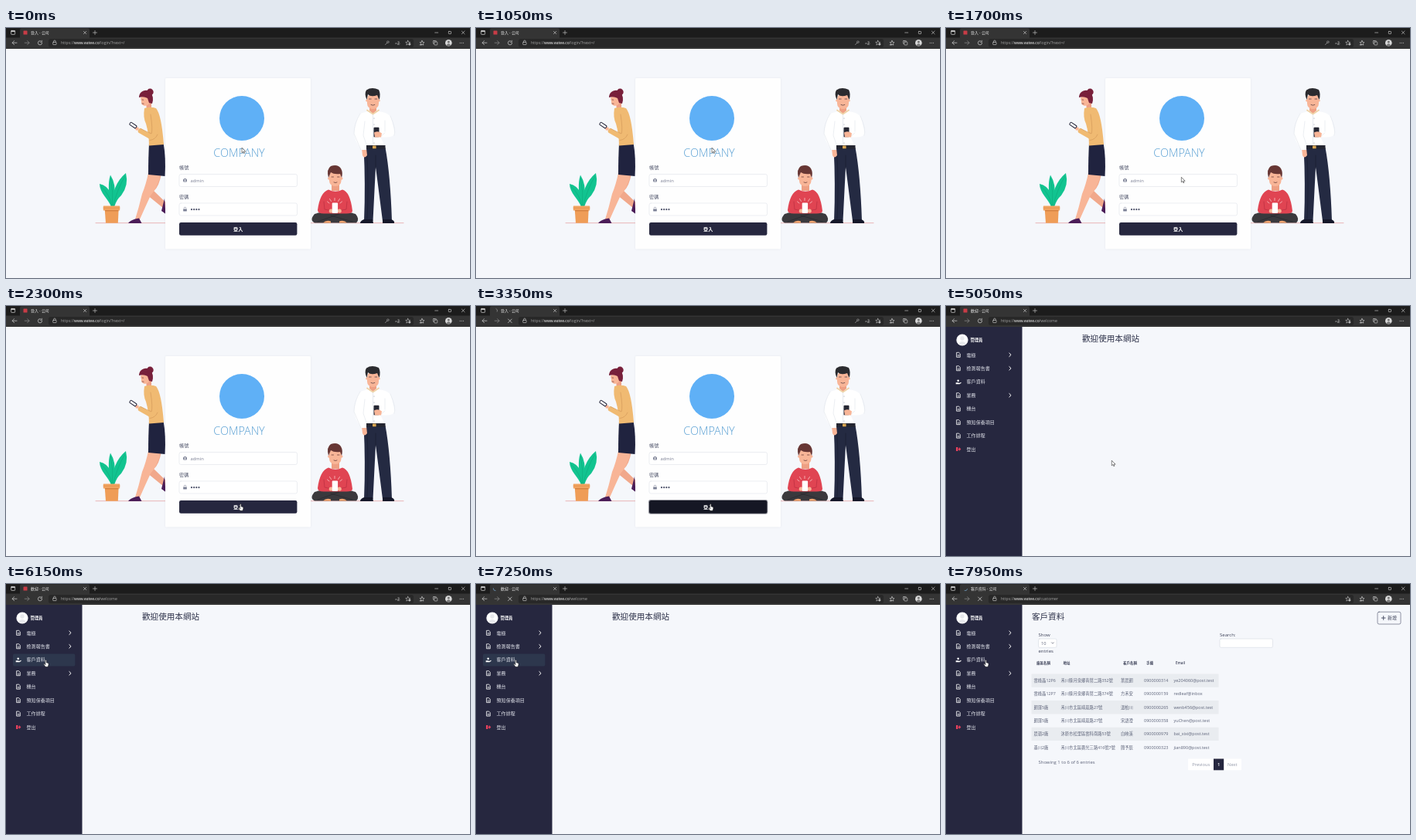
An HTML page with a canvas that plays this animation: 600 px wide and 324 px high, repeating every 8000 ms.

```html
<!DOCTYPE html>
<html lang="zh-Hant">
<head>
<meta charset="utf-8">
<title>登入 - 公司</title>
<style>
html, body { margin: 0; width: 100%; height: 100%; overflow: hidden; background: #f5f7fb; }
canvas { display: block; width: 100vw; height: 100vh; }
</style>
</head>
<body>
<canvas id="stage"></canvas>
<script>
const W = 600, H = 324, LOOP = 8000;
const CLICK_LOGIN = 3000, SHOW_WELCOME = 3650, WELCOME_READY = 4150;
const CLICK_MENU = 7250, SHOW_CUSTOMERS = 7700;
const NAVY = '#26273f', INK = '#3c4158', SKIN = '#f8b597';
const FONT = '"Open Sans", "Noto Sans CJK TC", "Noto Sans CJK", sans-serif';
const canvas = document.getElementById('stage');
const ctx = canvas.getContext('2d');

// Drawing helpers
function text(str, x, y, size, color, weight = 400, align = 'left') {
  ctx.font = `${weight} ${size}px ${FONT}`;
  ctx.textAlign = align;
  ctx.fillStyle = color;
  ctx.fillText(str, x, y + size * 0.37);
}
function rect(x, y, w, h, color, r = 0, border, bw = 0.5) {
  ctx.beginPath();
  ctx.roundRect(x, y, w, h, r);
  if (color) { ctx.fillStyle = color; ctx.fill(); }
  if (border) { ctx.strokeStyle = border; ctx.lineWidth = bw; ctx.stroke(); }
}
function circle(x, y, r, color) {
  ctx.beginPath();
  ctx.arc(x, y, r, 0, Math.PI * 2);
  ctx.fillStyle = color;
  ctx.fill();
}
function arc(x, y, r, a, b, color, width) {
  ctx.beginPath();
  ctx.arc(x, y, r, a, b);
  ctx.strokeStyle = color;
  ctx.lineWidth = width;
  ctx.stroke();
}
function fill(d, color) {
  ctx.fillStyle = color;
  ctx.fill(new Path2D(d));
}
function line(d, color, width = 0.7) {
  ctx.strokeStyle = color;
  ctx.lineWidth = width;
  ctx.stroke(new Path2D(d));
}
function at(x, y, draw) {
  ctx.save();
  ctx.translate(x, y);
  draw();
  ctx.restore();
}

// Browser frame
const star = 'M0-3L.9-.9 3-.8 1.4.7 1.9 2.9 0 1.7-1.9 2.9-1.4.7-3-.8-.9-.9Z';

function drawBrowser(t, page, loading) {
  const pale = '#d6d6d6';
  rect(0, 0, W, 13, '#1c1c1c');
  rect(0, 12.5, W, 14.5, '#343434');
  rect(18, 0.5, 90, 14, '#343434', 2);
  rect(6.6, 3.4, 5, 5, null, 0.7, pale, 0.7);
  rect(6.6, 3.4, 5, 1.5, pale);
  if (loading) {
    const a = t / 140;
    arc(25, 6, 2.6, a, a + 1.7, page === pages.login ? '#9a9a9a' : '#7fb2dc', 0.7);
  } else {
    rect(22.5, 3.6, 5, 5, '#c83c46', 0.4);
  }
  text(page.tab, 32, 6, 4.9, '#e0e0e0');
  line('M100.4 4.3l3.4 3.4m0-3.4l-3.4 3.4', pale, 0.6);
  line('M112.5 6h5m-2.5-2.5v5', pale, 0.6);
  line('M554.7 6h4M589.3 4l3.8 3.8m0-3.8l-3.8 3.8', pale, 0.6);
  rect(572.3, 4.4, 3.2, 3.2, null, 0.5, pale, 0.6);

  line('M14 19.2H8.2m2.4-2.5l-2.5 2.5 2.5 2.5', pale, 0.7);
  line('M24.2 19.2H30m-2.4-2.5l2.5 2.5-2.5 2.5', '#8f8f8f', 0.7);
  if (loading) {
    line('M41.6 17l4.6 4.6m0-4.6l-4.6 4.6', pale, 0.75);
  } else {
    arc(44, 19.3, 2.6, 0, 5.2, pale, 0.7);
    line('M46.4 16.2v2.1h-2.1', pale, 0.6);
  }
  rect(55, 13.9, 472, 11, '#282828', 2.5);
  rect(60.7, 18.4, 4.4, 3.2, null, 0.5, pale, 0.6);
  line('M61.6 18.3v-1a1.3 1.3 0 0 1 2.6 0v1', pale, 0.6);
  text('https://', 71, 19.2, 5, '#a5a5a5');
  text('www.eatee.co', 88, 19.2, 5.05, '#ffffff');
  text(page.path, 120.3, 19.2, 5.2, '#a5a5a5');

  if (page === pages.login) {
    line('M490.5 21.6l2.6-2.6', '#aaa', 0.7);
    arc(493.8, 18.2, 1.3, 0, 7, '#aaa', 0.6);
  }
  if (page === pages.login || (page === pages.welcome && !loading))
    text('aあ', 506.5, 19.2, 4.2, '#bdbdbd', 400, 'center');
  at(519.7, 19.2, () => line(star, '#c4c4c4', 0.6));
  circle(522, 21, 1.4, '#b5b5b5');
  at(538, 19.3, () => line(star, pale, 0.6));
  line('M535 21.8h3', pale, 0.6);
  rect(552.4, 16.5, 4, 4, null, 0.7, pale, 0.6);
  rect(553.8, 18, 4, 4, '#343434', 0.7, pale, 0.6);
  circle(572.3, 19.3, 4.3, '#d9d9d9');
  circle(572.3, 18.1, 1.5, '#777');
  fill('M569.5 22.3q2.8-4 5.6 0q-2.8 2.4-5.6 0Z', '#777');
  for (let i = -1; i < 2; i++) circle(589.3 + i * 2.1, 19.2, 0.55, pale);
}

// Illustrated people
function drawPlant() {
  const green = '#12c490';
  fill('M138 232C136 214 143 198 155 188Q159 204 149 217Q143 222 140 232Z', green);
  fill('M136 232C133 222 121 214 121 202Q131 204 135 214Q138 222 138 232Z', green);
  fill('M136.500 230Q130 206 135 190.500Q143 203 140 220L138.500 231Z', green);
  line('M138.500 231Q144 208 154 192M137 231Q135 217 123 205M137.500 230Q139 212 135.500 195', '#0fa379', 0.5);
  fill('M127.800 236H145.600L144.800 252.700H129Z', '#ef9d57');
  rect(125.8, 230.5, 21.4, 6, '#f2a461', 0.5);
  rect(128, 236.2, 17.4, 1.2, '#cf7c3c');
  line('M126 233.200H147', '#d88946', 0.6);
}
function drawWoman() {
  fill('M201 188Q198 206 191 211L206.500 226V236L182 216Q186 196 190 188Z', '#f1a88b');
  fill('M205 221L201 237 206.500 241Z', '#4b1d58');
  fill('M184 188H200Q197 206 187 217Q180 232 173 248H167Q172 232 176 215Q181 203 184 188Z', SKIN);
  fill('M172 246.500L175.500 253H158Q160 249.700 167 247.500Z', '#4b1d58');
  fill('M185 150L203.500 149Q207 168 205.500 192L184 190Q184 168 185 150Z', '#20233f');
  fill('M181 96H188V105L182 107Z', '#eea084');
  fill('M179 104Q187 101.500 194 104Q201 112 204 151L185 152.500Q185 138 181 124Q177 116 179 104Z', '#f0ba72');
  fill('M174 91Q178 85 186 88L186.500 96Q183 102 178 100.500Q174.500 99 175 95Z', SKIN);
  fill('M172 90C172 82 180 78.500 186 82Q192 89 189 98L185 97 183 91Q178 88 172 90Z', '#78203b');
  circle(186.3, 83, 4.4, '#78203b');
  line('M176 93l1.600.200M176 98l2 .200', '#51202a', 0.6);
  line('M192 113Q196 138 188 141.500L174 133.500', '#f0ba72', 6.5);
  line('M187 112Q190 132 188 137L174 130.500M186 145.500Q193 145 196 138', '#c98d50', 0.5);
  circle(169.5, 130.5, 2.3, SKIN);
  at(164.3, 126, () => {
    ctx.rotate(0.6);
    rect(-4.6, -1.8, 9.4, 3.6, '#fff', 0.8, '#25253a', 1);
  });
}
function drawBoy() {
  fill('M399 241Q425 233 452 241Q458 248 453 252.500H399Q392 249 399 241Z', '#3a393d');
  line('M403 251L431 241M448 251L420 243', '#28282d', 0.7);
  fill('M410 252.500Q414 248.500 420 250.500V252.700ZM431 250.500Q437 248.500 441 252.500H431Z', '#f3a56f');
  fill('M421 200H431V211H421Z', '#eea084');
  fill('M417 209.500Q426 214 435 209.500Q445 212 448 237Q448 240.500 440 240.500H411Q403 240.500 403 236Q406 213 417 209.500Z', '#e04452');
  line('M411 225L412 235 421 237M441 225L440 235 430 237', '#b92f41', 0.7);
  rect(418, 185, 15.5, 20, SKIN, 7);
  circle(417.8, 195, 1.7, SKIN);
  circle(433.8, 195, 1.7, SKIN);
  fill('M417 194Q414 183 420 179Q429 176 433 182Q436 187 434 194L432 189Q424 190 420 187Z', '#673634');
  line('M421 193h2.500M428.500 193h2.500M424 200q2 1.300 4 0', '#59302d', 0.7);
  circle(420.3, 237, 2.6, SKIN);
  circle(431.2, 237, 2.6, SKIN);
  rect(421.7, 226.5, 7.4, 13.5, '#fff', 1);
  line('M418 227l-2.500-2M420.500 224.500l-2-3M425 223.500v-3M429.500 224.500l2-3M432 227l2.500-2', '#ffd9d6', 0.7);
}
function drawMan() {
  fill('M462.500 155H490.500Q497 190 499 250H487L478 180 474.500 250H463Q465 202 462.500 155Z', '#242a42');
  line('M478 165V182M467 165Q469 210 467 247', '#151a2b', 0.5);
  fill('M463 248H474L475 253H458Q458 250 463 248ZM487 248H498Q503 250 502 253H487Z', '#15182a');
  fill('M460 156H466L467 165Q463 170 461 165Z', SKIN);
  fill('M468 108L474.500 111 481 108Q494 109 498 116L503 137Q500 143 484 141L490 153H466V158H459Q450 144 450 136Q453 117 458 111Z', '#ffffff');
  fill('M470 100H479V107L474.500 111 470 107Z', '#eea084');
  line('M464 121L462 139 467 154M490 120V134M484 141L490 136M458 111Q450 124 450 137L459 158M497 114Q505 132 502 139', '#dde2ea', 0.6);
  line('M467 106.500l7.500 5 7.500-5', '#efd2a6', 1.8);
  line('M474.500 112V152', '#cfd5df', 0.5);
  for (let y = 117; y < 150; y += 8) circle(476, y, 0.55, '#8e96a8');
  rect(466, 152, 24.5, 4.6, '#252631');
  rect(474, 152.4, 4.6, 3.8, '#d9a651', 0.5);
  rect(467, 85, 15, 20, SKIN, 7);
  circle(466.8, 94, 1.6, SKIN);
  circle(482.2, 94, 1.6, SKIN);
  fill('M466.500 93Q463 85 466 80.500Q473 76 482 80Q485 86 482.500 93L480 87Q472 90 468 86Z', '#2b2b2f');
  line('M469.500 92h2.700M477 92h2.700M472 99.500q2.300 1.500 4.800 0', '#47333a', 0.7);
  rect(475.500, 128.8, 7, 12.5, '#252733', 1);
  fill('M476 135.500Q481 132.500 486 136.500L485 141.500H477Z', SKIN);
}

// Pages
const fileIcon = 'M-2-3H.7L2.300-1.400V3H-2Z';

function drawLogin(pressed) {
  line('M116 252.700H207M393 252.700H514', '#e59a98', 0.7);
  drawPlant();
  drawWoman();
  drawBoy();
  drawMan();
  ctx.save();
  ctx.shadowColor = 'rgba(40,50,90,.08)';
  ctx.shadowBlur = 3;
  rect(206, 65, 188, 221.5, '#fefefe', 1.5);
  ctx.restore();
  circle(305, 117, 29, '#5fb0f6');
  text('COMPANY', 301.5, 161.5, 14.4, '#589fd3', 300, 'center');
  text('帳號', 224, 181.2, 6.2, '#4b5067', 500);
  text('密碼', 224, 218.8, 6.2, '#4b5067', 500);
  for (const y of [189.5, 227]) rect(224, y, 152.5, 16, '#fff', 2.2, '#dfe2ea', 0.6);
  circle(231.5, 197.5, 2.5, '#7b8095');
  circle(231.5, 196.8, 0.9, '#fff');
  fill('M230 199q1.500-1.400 3 0q-1.500 1-3 0Z', '#fff');
  rect(229.2, 234.8, 4.6, 2.6, '#7b8095', 0.5);
  line('M230.200 234.800v-1.200a1.300 1.300 0 0 1 2.600 0v1.200', '#7b8095', 0.6);
  text('admin', 238.5, 197.4, 5.8, '#777c91');
  for (let i = 0; i < 4; i++) circle(240 + i * 3.15, 235.2, 1.1, '#4f546b');
  if (pressed) rect(222.9, 250.9, 154.4, 18.8, '#96979f', 3);
  rect(224, 252, 152.4, 16.8, pressed ? '#151724' : NAVY, 2.2);
  text('登入', 300.2, 260.5, 6.1, '#fff', 700, 'center');
}

const menu = ['電極', '檢測報告書', '客戶資料', '業務', '機台', '預知保養項目', '工作排程', '登出'];
const menuY = i => 63.3 + i * 17.47;

function menuAt([x, y]) {
  if (x < 9 || x > 89) return -1;
  return menu.findIndex((_, i) => Math.abs(y - menuY(i)) < 8);
}
function drawSidebar(hover) {
  rect(0, 26.5, 98.5, H, NAVY);
  circle(21, 44, 7.6, '#fff');
  circle(21, 42, 2.7, '#e8e9ec');
  fill('M16 48.700q5-6 10 0q-5 4-10 0Z', '#e8e9ec');
  text('管理員', 31.5, 43.8, 5.3, '#fff', 700);
  menu.forEach((name, i) => {
    const y = menuY(i);
    if (i === hover) rect(9, y - 7.8, 80.3, 16, '#2d374d', 2);
    text(name, 26.6, y, 6.02, '#e1e3eb');
    at(16, y, () => {
      if (i === 2) {
        fill('M-3.300 1H0l1 .800 2.300-1.200.500.800L1.500 3H-3.300Z', '#fff');
        circle(-0.3, -1.5, 1.3, '#fff');
      } else if (i === 7) {
        fill('M-3-2.500H-.500V2.500H-3ZM0-.900H1V-2.500L3.400 0 1 2.500V.900H0Z', '#e2405c');
      } else {
        line(fileIcon, '#fff', 0.8);
        line('M-1 .200h2.200M-1 1.600h2.200', '#fff', 0.6);
      }
    });
    if (i < 2 || i === 3) at(83, y, () => line('M-1.200-2.200L1.100 0-1.200 2.200', '#fff', 1));
  });
}

const columns = [113.5, 148.5, 226, 256, 294.5];
const heads = [['廠區名稱', 117], ['地址', 151.5], ['客戶名稱', 229], ['手機', 259], ['Email', 297]];
const customers = [
  ['雲峰晶12P6', '禾川縣月泉鄉青葉二路352號', '葉晨朗', '0900000314', 'ye204060@post.test'],
  ['雲峰晶12P7', '禾川縣月泉鄉青葉二路374號', '方禾安', '0900000159', 'redleaf@inbox'],
  ['朗澤5廠', '禾川市北區晴嵐路27號', '溫柏川', '0900000265', 'wenb456@post.test'],
  ['朗澤5廠', '禾川市北區晴嵐路27號', '宋語澄', '0900000358', 'yuChen@post.test'],
  ['晨嶺2廠', '沐原市松里區雲科南路53號', '白映溪', '0900000979', 'bai_xixi@post.test'],
  ['墨川2廠', '禾川市北區霽光三路416號7號', '簡予辰', '0900000323', 'jian890@post.test']
];

function drawCustomers() {
  const soft = '#5d6379';
  text('客戶資料', 111, 42, 10.55, '#2c3048');
  rect(558, 36.2, 30, 15.8, null, 2, '#4a4f68', 0.6);
  line('M563.300 44h4.800m-2.400-2.400v4.800', INK, 0.9);
  text('新增', 571, 44, 6, INK, 500);
  text('Show', 119.5, 66, 6, INK);
  rect(119.5, 71, 23.5, 11.3, '#fff', 1.6, '#d3d8e1', 0.6);
  text('10', 123, 76.5, 5.6, soft);
  line('M136.500 75.800l1.400 1.400 1.400-1.400', INK, 0.6);
  text('entries', 119.5, 86.7, 6, INK);
  text('Search:', 354, 66, 6, INK);
  rect(354, 71, 68.5, 11.3, '#fff', 1.6, '#d3d8e1', 0.6);
  for (const [name, x] of heads) text(name, x, 102, 4.5, INK, 600);
  customers.forEach((row, i) => {
    const y = 125 + i * 17.35;
    if (i % 2 === 0) rect(110.5, y - 8.6, 242, 17.3, '#e9ecf0');
    row.forEach((cell, c) => text(cell, columns[c], y, c > 2 ? 5.5 : 5.3, soft));
  });
  text('Showing 1 to 6 of 6 entries', 119.5, 231, 5.93, soft);
  rect(313, 226.5, 69, 14.8, '#fff', 1);
  rect(346, 226.5, 13.2, 14.8, NAVY);
  text('Previous', 329.8, 233.8, 5.8, '#9298a8', 400, 'center');
  text('1', 352.6, 233.8, 5.8, '#fff', 600, 'center');
  text('Next', 370.3, 233.8, 5.8, '#9298a8', 400, 'center');
}

const pages = {
  login: { tab: '登入 - 公司', path: '/login/?next=/' },
  welcome: { tab: '歡迎 - 公司', path: '/welcome' },
  customers: { tab: '客戶資料 - 公司', path: '/customer' }
};

// Pointer
const moves = [
  { from: 1450, to: 2050, a: [305, 155.5], b: [303.3, 256.5] },
  { from: 4650, to: 5650, a: [303.3, 256.5], b: [51.5, 98.5] }
];
function pointerAt(t) {
  const m = t < moves[1].from ? moves[0] : moves[1];
  const k = Math.min(1, Math.max(0, (t - m.from) / (m.to - m.from)));
  const e = k * k * (3 - 2 * k);
  return m.a.map((v, i) => v + (m.b[i] - v) * e);
}
function drawPointer([x, y], hand) {
  const d = hand
    ? 'M-.700.500Q0-.700.700.500V3.300L3.500 4.200V6.300L2.700 8.800H-.500L-2.700 5.600Q-2.700 4.500-1.700 5L-.700 6Z'
    : 'M0 0V6.200L1.500 4.900 2.600 7.100 3.600 6.600 2.500 4.500H4.400Z';
  at(x, y, () => {
    fill(d, '#fff');
    line(d, '#222', 0.55);
  });
}

function render(t) {
  const page = t < SHOW_WELCOME ? pages.login : t < SHOW_CUSTOMERS ? pages.welcome : pages.customers;
  const loading = (t >= CLICK_LOGIN && t < WELCOME_READY) || t >= CLICK_MENU;
  const pointer = pointerAt(t);
  const hover = menuAt(pointer);
  let hand;
  rect(0, 0, W, H, '#f5f7fb');
  if (page === pages.login) {
    drawLogin(t >= CLICK_LOGIN);
    hand = pointer[1] > 252;
  } else {
    drawSidebar(page === pages.welcome ? hover : -1);
    if (page === pages.welcome) text('歡迎使用本網站', 176, 42, 10.6, '#2c3048');
    else drawCustomers();
    hand = hover >= 0 || t < moves[1].from;
  }
  drawBrowser(t, page, loading);
  drawPointer(pointer, hand);
}

function frame(now) {
  const dpr = window.devicePixelRatio || 1;
  const w = Math.round(innerWidth * dpr), h = Math.round(innerHeight * dpr);
  if (canvas.width !== w || canvas.height !== h) {
    canvas.width = w;
    canvas.height = h;
  }
  ctx.setTransform(w / W, 0, 0, h / H, 0, 0);
  ctx.lineCap = 'round';
  ctx.lineJoin = 'round';
  render(now % LOOP);
  requestAnimationFrame(frame);
}
requestAnimationFrame(frame);
</script>
</body>
</html>
```
